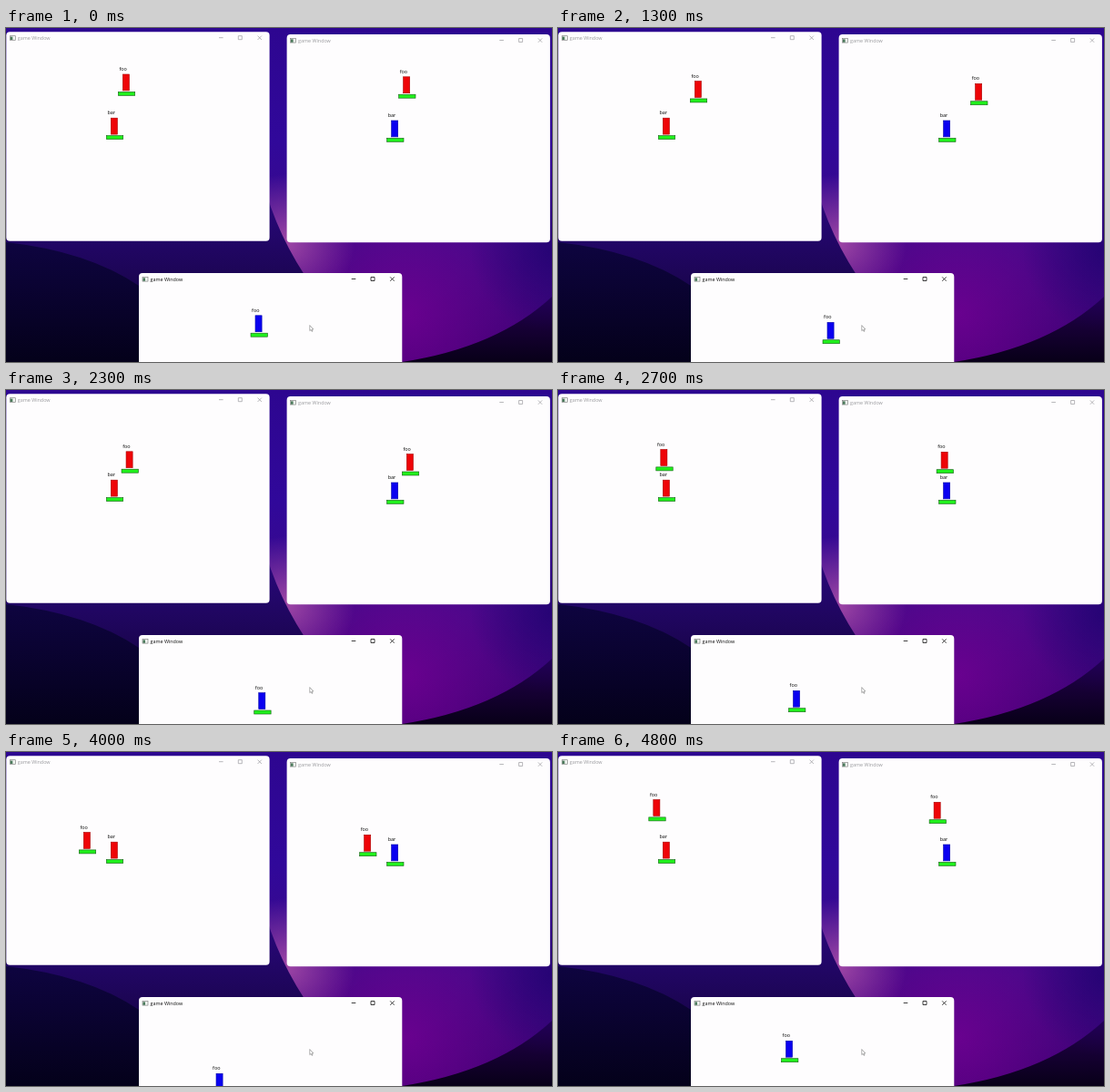
These frames come from a looping animation (600x368 px, 4.9 s). An HTML page with a canvas:

```html
<!DOCTYPE html>
<html lang="en">
<head>
<meta charset="utf-8">
<title>game Window</title>
<style>
html, body { margin: 0; width: 100%; height: 100%; overflow: hidden; background: #14004a; }
canvas { display: block; width: 600px; height: 368px; }
</style>
</head>
<body>
<canvas id="stage"></canvas>
<script>
const W = 600, H = 368, LOOP = 4900, STEP = 100;
const canvas = document.getElementById('stage');
const scale = window.devicePixelRatio || 1;
canvas.width = W * scale;
canvas.height = H * scale;
const ctx = canvas.getContext('2d');
ctx.scale(scale, scale);

const RED = '#ee0508', BLUE = '#0a00f0', GREEN = '#20f01c';
const windows = [
  { x: 0.3, y: 4.2, h: 230.5, foo: RED, bar: RED },
  { x: 308.6, y: 7, h: 229.2, foo: RED, bar: BLUE },
  { x: 146, y: 270, h: 120, foo: BLUE, active: true }
];

// [time, value] points of the walking player, joined by straight lines
const pathX = [[0, 123], [100, 123], [360, 111], [530, 111], [1250, 145], [1920, 145],
  [2700, 107.5], [3280, 80], [4000, 80], [4150, 73], [4250, 73], [4800, 99.5]];
const pathY = [[0, 46.5], [1140, 46.5], [1840, 79.5], [1950, 79.5], [2350, 61], [2700, 61],
  [2950, 72], [3280, 72], [3540, 84], [4030, 84], [4800, 48]];

function at(path, t) {
  const i = path.findIndex(p => p[0] > t);
  if (i < 0) return path[path.length - 1][1];
  const [t0, a] = path[i - 1], [t1, b] = path[i];
  return a + (b - a) * (t - t0) / (t1 - t0);
}

function fillPath(d, color) {
  ctx.fillStyle = color;
  ctx.fill(new Path2D(d));
}

function glow(x, y, r, rgb, alpha) {
  const g = ctx.createRadialGradient(x, y, 0, x, y, r);
  g.addColorStop(0, `rgba(${rgb},${alpha})`);
  g.addColorStop(1, `rgba(${rgb},0)`);
  ctx.fillStyle = g;
  ctx.fillRect(0, 0, W, H);
}

function vertical(y0, y1, ...colors) {
  const g = ctx.createLinearGradient(0, y0, 0, y1);
  colors.forEach((c, i) => g.addColorStop(i / (colors.length - 1), c));
  return g;
}

function drawBackdrop() {
  ctx.fillStyle = vertical(0, H, '#2d0690', '#30089a', '#3c0a86', '#38006e');
  ctx.fillRect(0, 0, W, H);
  glow(440, 315, 170, '120,0,150', 0.75);
  glow(308, 236, 75, '190,90,175', 0.75);
  fillPath('M0 150H278Q291 215 328 272V368H0Z', vertical(180, H, '#2a0880', '#1c0554', '#0c0230'));
  fillPath('M0 236Q90 246 146 284V368H0Z', vertical(236, H, '#0e0440', '#04011a'));
  fillPath('M435 368Q540 352 600 296V368Z', vertical(300, H, '#22004c', '#080018'));
  glow(600, 245, 90, '30,0,110', 0.7);
}

function text(str, x, y, color) {
  ctx.fillStyle = color;
  ctx.font = '5.4px "Open Sans", "Noto Sans", sans-serif';
  ctx.fillText(str, x, y);
}

function box(x, y, w, h, fill, stroke) {
  ctx.fillStyle = fill;
  ctx.fillRect(x, y, w, h);
  ctx.strokeStyle = stroke;
  ctx.lineWidth = 0.6;
  ctx.strokeRect(x, y, w, h);
}

function drawPlayer(name, x, y, color) {
  text(name, x + 1.4, y - 3.6, '#000');
  box(x + 5.3, y + 0.3, 7.1, 17.9, color, color === RED ? '#a00' : '#0000a8');
  box(x + 0.3, y + 19.7, 18.4, 4, GREEN, '#145c14');
}

function drawWindow(win, x, y) {
  const ink = win.active ? '#111' : '#9a9a9e';
  ctx.save();
  ctx.translate(win.x, win.y);
  ctx.beginPath();
  ctx.roundRect(0, 0, 289.3, win.h, 4);
  ctx.fillStyle = '#fefdfe';
  ctx.fill();
  ctx.clip();

  box(4, 4.5, 6, 4.6, '#eef2ee', '#777');
  ctx.fillStyle = '#4c7a5c';
  ctx.fillRect(4.4, 5.4, 2.6, 3.4);
  text('game Window', 12.5, 8.6, ink);

  ctx.strokeStyle = ink;
  ctx.lineWidth = win.active ? 0.8 : 0.7;
  ctx.stroke(new Path2D('M233.7 6.5h4.6M255 4.5h4v4h-4zM276.2 4.4l4.4 4.4m0-4.4l-4.4 4.4'));

  if (win.bar) drawPlayer('bar', 109.7, 94.7, win.bar);
  drawPlayer('foo', x - 0.3, y, win.foo);
  ctx.restore();
}

function drawCursor() {
  const arrow = new Path2D('M333.8 327.6v6l1.3-1.2 1 2 .9-.4-.9-2h1.7z');
  ctx.fillStyle = '#fff';
  ctx.fill(arrow);
  ctx.strokeStyle = '#777';
  ctx.lineWidth = 0.6;
  ctx.stroke(arrow);
}

function frame(now) {
  const t = Math.floor(now % LOOP / STEP) * STEP;
  const x = at(pathX, t), y = at(pathY, t);
  drawBackdrop();
  windows.forEach(win => drawWindow(win, x, y));
  drawCursor();
  requestAnimationFrame(frame);
}

frame(0);
</script>
</body>
</html>
```
